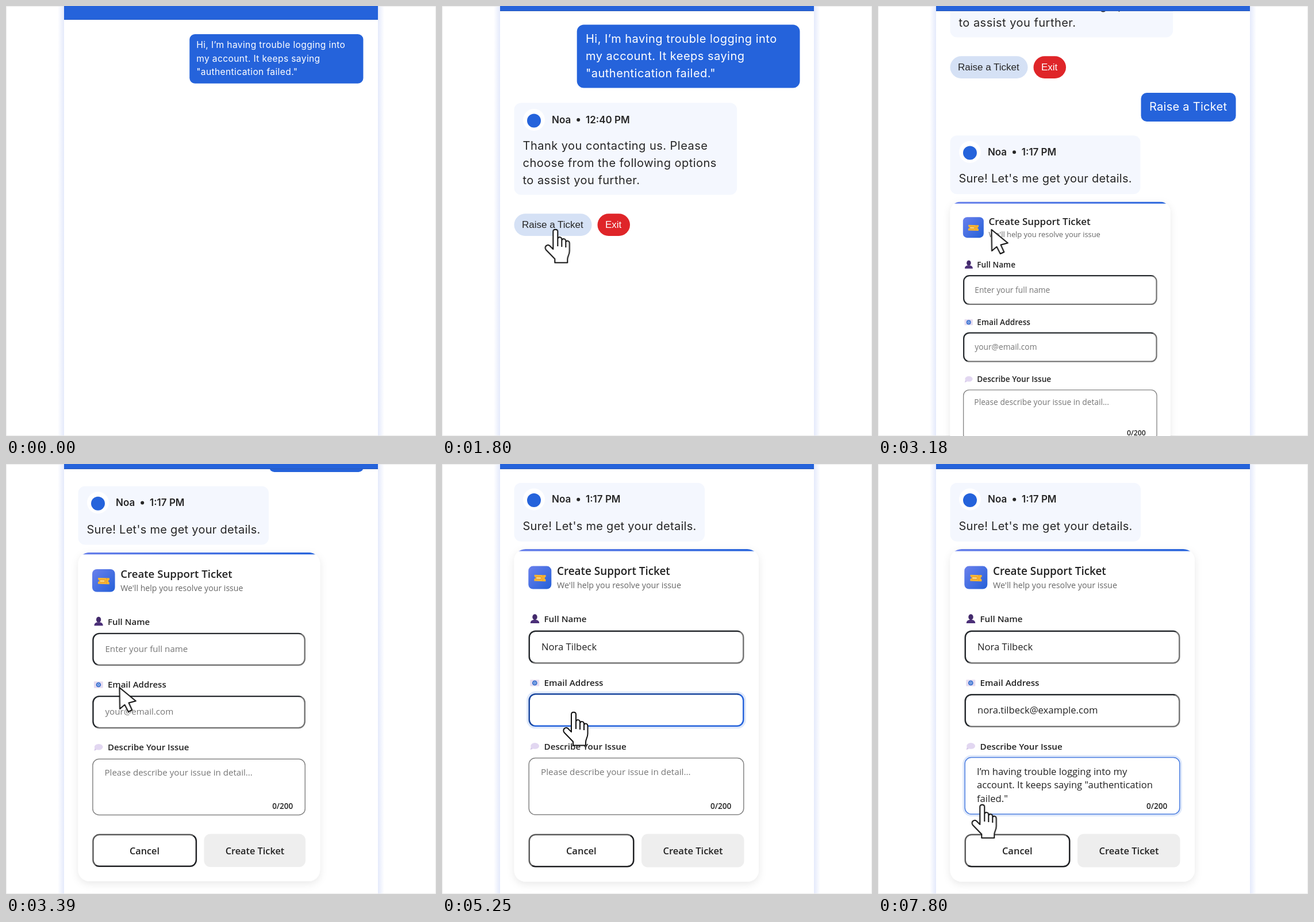
An HTML page that plays this animation: 748 by 748 pixels, repeating every 8 s.

```html
<!DOCTYPE html>
<html lang="en">
<head>
<meta charset="utf-8">
<title>Support chat</title>
<style>
  html, body { margin: 0; width: 100%; height: 100%; overflow: hidden; background: #fff; }
  svg { display: block; width: 100vw; height: 100vh; }
  text { white-space: pre; fill: #262626; }

  /* chat */
  .chat text { font: 400 20px Inter, sans-serif; letter-spacing: .48px; }
  .chat .mine text { fill: #fff; }
  .chat .short { letter-spacing: .28px; }
  .chat .who { font: 600 17px Inter, sans-serif; letter-spacing: 0; }
  .chat .pill { font: 17px "Liberation Sans", Arial, sans-serif; letter-spacing: 0; }
  .blue { fill: #2563db; }
  .card { fill: #f4f7fe; }

  /* form */
  .form text { font: 400 16.6px "Open Sans", "Noto Sans", sans-serif; fill: #222; }
  .form .title { font-size: 18.9px; font-weight: 600; }
  .form .sub { font-size: 14.3px; fill: #666; }
  .form .label { font-size: 15.2px; font-weight: 600; }
  .form .count { font-size: 13.6px; font-weight: 600; }
  .form .act { font-size: 16.5px; font-weight: 600; text-anchor: middle; }
  .form .hint { font-size: 15.3px; fill: #767676; }
  .box { fill: #fff; stroke: url(#inset); stroke-width: 2.5; }
  .area .box { stroke: #858585; stroke-width: 1.5; }
  .ring { fill: none; stroke: #2563db; stroke-opacity: .15; stroke-width: 3.5; visibility: hidden; }
  .on { transform: translateY(-1px); }
  .on .ring { visibility: visible; }
  .on .box { stroke: url(#focus); }
  .area.on .box { stroke: #4a7de0; }

  /* motion, one 8 s loop; 1% = 80 ms */
  .anim { animation: 8s linear infinite; }
  .bar { animation-name: bar; }
  .ask { animation-name: ask; transform-origin: 622.5px 32.5px; }
  .greet { animation-name: greet; transform-origin: 125.5px 168.5px; }
  .pick { animation-name: pick; transform-origin: 622.5px 425px; }
  .reply { animation-name: reply; transform-origin: 125.5px 499.3px; }
  .form { animation-name: form; transform-origin: 125.5px 148px; }
  .feed { animation-name: feed; }
  .press { animation-name: press; fill: #d5e1f5; }
  .cursor { animation-name: cursor; }
  .bar, .ask, .greet, .pick, .reply { animation-timing-function: cubic-bezier(.333, .667, .667, 1); }
  .form { animation-timing-function: cubic-bezier(.165, .84, .44, 1); }
  .feed { animation-timing-function: cubic-bezier(.65, 0, .35, 1); }
  .cursor { animation-timing-function: ease-in-out; }

  @keyframes bar { 0% { transform: translateY(15.5px); } 4.125%, 100% { transform: none; } }
  @keyframes ask {
    0% { transform: translate(-1px, 16.5px) scale(.778); }
    4.125%, 100% { transform: translate(0, 0) scale(1); }
  }
  @keyframes greet {
    0%, 6.375% { opacity: 0; transform: scale(.583); }
    7.2% { opacity: 1; }
    12%, 100% { opacity: 1; transform: scale(1); }
  }
  @keyframes pick {
    0%, 24.94% { opacity: 0; transform: scale(.583); }
    25.7% { opacity: 1; }
    29.25%, 100% { opacity: 1; transform: scale(1); }
  }
  @keyframes reply {
    0%, 30% { opacity: 0; transform: scale(.583); }
    30.8% { opacity: 1; }
    34.875%, 37.125% { transform: scale(.988); }
    41.25%, 100% { opacity: 1; transform: scale(1); }
  }
  @keyframes form {
    0%, 37.6875% { opacity: 0; transform: scale(.583); }
    38.5% { opacity: 1; }
    44.625%, 100% { opacity: 1; transform: scale(1); }
  }
  @keyframes feed {
    0%, 35.8125% { transform: translateY(0); }
    43.25%, 100% { transform: translateY(-466.5px); }
  }
  @keyframes press { 0%, 23.5% { fill: #d5e1f5; } 24.2% { fill: #bdd0f0; } 24.8%, 100% { fill: #d5e1f5; } }
  @keyframes cursor {
    0%, 14.8% { transform: translate(756px, 140px); }
    22.5%, 45.2% { transform: translate(197.3px, 388px); }
    52.5%, 59.1% { transform: translate(228px, 322px); }
    64.5%, 74.8% { transform: translate(229px, 431px); }
    82.5%, 100% { transform: translate(181.3px, 592px); }
  }
</style>
</head>
<body>
<svg viewBox="0 0 748 748">
  <defs>
    <linearGradient id="inset" x2="1" y2="1">
      <stop offset=".5" stop-color="#262a2e"/><stop offset=".5" stop-color="#767676"/>
    </linearGradient>
    <linearGradient id="outset" x2="1" y2="1">
      <stop offset=".5" stop-color="#5c5c5c"/><stop offset=".5" stop-color="#202124"/>
    </linearGradient>
    <linearGradient id="focus" x2="1" y2="1">
      <stop offset=".5" stop-color="#1a479e"/><stop offset=".5" stop-color="#2563db"/>
    </linearGradient>
    <linearGradient id="brand" x2="1" y2="1">
      <stop stop-color="#6a80ec"/><stop offset="1" stop-color="#2460d8"/>
    </linearGradient>
    <linearGradient id="strip">
      <stop stop-color="#667eea"/><stop offset="1" stop-color="#2563db"/>
    </linearGradient>
    <linearGradient id="side">
      <stop stop-color="#e3e9fb" stop-opacity="0"/><stop offset="1" stop-color="#e3e9fb"/>
    </linearGradient>
    <filter id="soft" x="-10%" y="-10%" width="120%" height="120%">
      <feDropShadow dx="0" dy="4" stdDeviation="7" flood-color="#000" flood-opacity=".09"/>
    </filter>
    <clipPath id="page"><rect x="101" width="546" height="748"/></clipPath>
    <clipPath id="sheet"><rect x="125.5" y="148" width="425.5" height="578.5" rx="20"/></clipPath>
    <g id="avatar"><circle r="19" fill="#fff"/><circle cy="1.5" r="12" class="blue"/></g>
  </defs>

  <rect width="748" height="748" fill="#fff"/>
  <rect x="90" width="11.5" height="748" fill="url(#side)"/>
  <rect x="90" width="11.5" height="748" fill="url(#side)" transform="matrix(-1 0 0 1 748 0)"/>
  <rect x="101" width="546" height="748" fill="#fff"/>
  <rect x=".5" y=".5" width="747" height="747" fill="none" stroke="#e9e9e9"/>

  <g clip-path="url(#page)">
    <g class="feed anim">
      <g class="chat">
        <g class="ask anim mine">
          <rect class="blue" x="234.7" y="32.5" width="387.8" height="110" rx="12"/>
          <text x="250" y="64">Hi, I’m having trouble logging into</text>
          <text x="250" y="94">my account. It keeps saying</text>
          <text x="250" y="124">"authentication failed."</text>
        </g>

        <g class="greet anim">
          <rect class="card" x="125.5" y="168.5" width="387.7" height="160" rx="12"/>
          <use href="#avatar" x="160" y="198"/>
          <text class="who" x="191" y="203.5">Noa</text>
          <circle cx="237.2" cy="198" r="3" fill="#262626"/>
          <text class="who" x="250" y="203.5">12:40 PM</text>
          <text x="140.5" y="250">Thank you contacting us. Please</text>
          <text x="140.5" y="280">choose from the following options</text>
          <text x="140.5" y="310">to assist you further.</text>
          <rect class="press anim" x="125.5" y="361.3" width="135" height="38.7" rx="19.3"/>
          <text class="pill" x="139" y="386">Raise a Ticket</text>
          <rect x="270.5" y="361.3" width="56.5" height="38.7" rx="19.3" fill="#df2529"/>
          <text class="pill" x="284" y="386" style="fill:#fff">Exit</text>
        </g>

        <g class="pick anim mine">
          <rect class="blue" x="457.5" y="425" width="165" height="50" rx="10"/>
          <text class="short" x="472" y="456">Raise a Ticket</text>
        </g>

        <g class="reply anim">
          <rect class="card" x="125.5" y="499.3" width="331.5" height="102" rx="12"/>
          <use href="#avatar" x="160" y="528"/>
          <text class="who" x="191" y="533.8">Noa</text>
          <circle cx="237.2" cy="528.3" r="3" fill="#262626"/>
          <text class="who" x="250" y="533.8">1:17 PM</text>
          <text class="short" x="140.5" y="581.3">Sure! Let's me get your details.</text>
        </g>
      </g>

      <g transform="translate(0 466.5)">
        <g class="form anim">
          <rect x="125.5" y="148" width="425.5" height="578.5" rx="20" fill="#fff" filter="url(#soft)"/>
          <rect x="125.5" y="148" width="425.5" height="3.6" fill="url(#strip)" clip-path="url(#sheet)"/>

          <rect x="150.3" y="177.6" width="40" height="40" rx="8" fill="url(#brand)"/>
          <g transform="rotate(2 170.5 198)">
            <path d="M160.5 193h20v3.2a2 2 0 0 0 0 4v3.6h-20v-3.6a2 2 0 0 0 0-4z" fill="#fbb62f"/>
            <path d="M163.5 196.5h9v4h-9z" fill="#ffd877" stroke="#e0912a"/>
            <path d="M175.5 193.5v10" stroke="#d98522" stroke-dasharray="2 1.5"/>
          </g>
          <text class="title" x="200" y="192.5">Create Support Ticket</text>
          <text class="sub" x="200" y="216">We'll help you resolve your issue</text>

          <path d="M153.8 277c0-4 2.6-5.4 5.6-6h4.2c3 .6 5.6 2 5.6 6z" fill="#4b2f78"/>
          <ellipse cx="161.5" cy="266.3" rx="4.2" ry="5" fill="#432a6c"/>
          <text class="label" x="177.5" y="275.3">Full Name</text>
          <g id="nameBox">
            <rect class="ring" x="148.9" y="287.9" width="378.2" height="61.2" rx="13.5"/>
            <rect class="box" x="151.75" y="290.75" width="372.5" height="55.5" rx="11"/>
          </g>
          <text id="name" x="173" y="323.7"></text>

          <rect x="153.3" y="375.2" width="16" height="11.4" rx="1" fill="#e6dcf0"/>
          <circle cx="161.3" cy="380.9" r="4.4" fill="#3f74d0"/>
          <circle cx="161.3" cy="380.9" r="1.8" fill="none" stroke="#c4d8f8"/>
          <text class="label" x="177.5" y="386.4">Email Address</text>
          <g id="mailBox">
            <rect class="ring" x="148.9" y="398.4" width="378.2" height="61.2" rx="13.5"/>
            <rect class="box" x="151.75" y="401.25" width="372.5" height="55.5" rx="11"/>
          </g>
          <text id="mail" x="173" y="433.7"></text>

          <path d="M155 492l-1.4 5.2 5.4-2.4z" fill="#d6c8ea"/>
          <ellipse cx="161.6" cy="490.4" rx="7.4" ry="5.3" fill="#e2d7f1"/>
          <text class="label" x="177.5" y="496.5">Describe Your Issue</text>
          <g id="issueBox" class="area">
            <rect class="ring" x="149" y="509.3" width="378" height="102.9" rx="13.5"/>
            <rect class="box" x="151.2" y="511.6" width="373.6" height="98.4" rx="11"/>
          </g>
          <text id="line1" x="172" y="540.5"></text>
          <text id="line2" x="172" y="564.3"></text>
          <text id="line3" x="172" y="588"></text>
          <text class="count" x="467" y="599.5">0/200</text>

          <rect x="151.75" y="644.75" width="181.5" height="55.5" rx="11" fill="#fff" stroke="url(#outset)" stroke-width="2.5"/>
          <text class="act" x="242.3" y="679.2">Cancel</text>
          <rect x="347" y="643.5" width="178.5" height="58" rx="11" fill="#eee"/>
          <text class="act" x="436.5" y="679.2">Create Ticket</text>
        </g>
      </g>
    </g>

    <g class="bar anim">
      <rect class="blue" x="101" y="-20" width="546" height="29"/>
      <rect x="101" y="8" width="546" height="1" fill="#2a59b8"/>
    </g>
  </g>

  <g class="cursor anim" fill="#fff" stroke="#111" stroke-width="2" stroke-linejoin="round">
    <path id="arrow" d="M.2 1L.7 38 9.200 30.800 15.500 43 22 40 16.300 27.500 28.500 24.300z"/>
    <g id="hand">
      <path d="M-1 58.5V52L-16.500 36C-20 30-14 26-10 29L-4 35V4.500C-4-.5 4-.5 4 4.500V17C5 13 11 13 11 18V20C12 16 18 16 18 21V23C19 19 24.500 20 24.500 25V38C24.500 45 21 47 21 53V58.500z"/>
      <path d="M4 17V30M11 20V31M18 23V32" fill="none"/>
    </g>
  </g>
</svg>

<script>
  const LOOP = 8000, STEP = 30;
  const $ = id => document.getElementById(id);

  // when each field holds the focus
  const focus = { nameBox: [4290, 5190], mailBox: [5190, 6600], issueBox: [6600, LOOP] };

  // rate: characters per step; the hint stays until the field is focused
  const lines = [
    { id: 'name', hint: 'Enter your full name', clear: 4290, start: 4410, rate: 2, text: 'Nora Tilbeck' },
    { id: 'mail', hint: 'your@email.com', clear: 5190, start: 5430, rate: 2, text: 'nora.tilbeck@example.com' },
    { id: 'line1', hint: 'Please describe your issue in detail...', clear: 6600, start: 6810, rate: 3.1,
      text: 'I’m having trouble logging into my' },
    { id: 'line2', hint: '', clear: 0, start: 7290, rate: 2.8, text: 'account. It keeps saying "authentication' },
    { id: 'line3', hint: '', clear: 0, start: 7740, rate: 2.8, text: 'failed."' }
  ];

  // when the pointer is a hand
  const hands = [[1740, 2940], [3960, 4883], [5000, 6170], [6300, LOOP]];

  const within = (t, [from, to]) => t >= from && t < to;

  function draw(t) {
    for (const id in focus) $(id).classList.toggle('on', within(t, focus[id]));
    for (const { id, hint, clear, start, rate, text } of lines) {
      const el = $(id), waiting = t < clear;
      const count = Math.max(0, Math.floor(rate * (Math.floor((t - start) / STEP) + 1)));
      el.textContent = waiting ? hint : text.slice(0, count);
      el.classList.toggle('hint', waiting);
    }
    const hand = hands.some(span => within(t, span));
    $('hand').style.visibility = hand ? 'visible' : 'hidden';
    $('arrow').style.visibility = hand ? 'hidden' : 'visible';
  }

  let begin;
  function tick(now) {
    begin ??= now;
    draw((now - begin) % LOOP);
    requestAnimationFrame(tick);
  }
  draw(0);
  requestAnimationFrame(tick);
</script>
</body>
</html>
```
